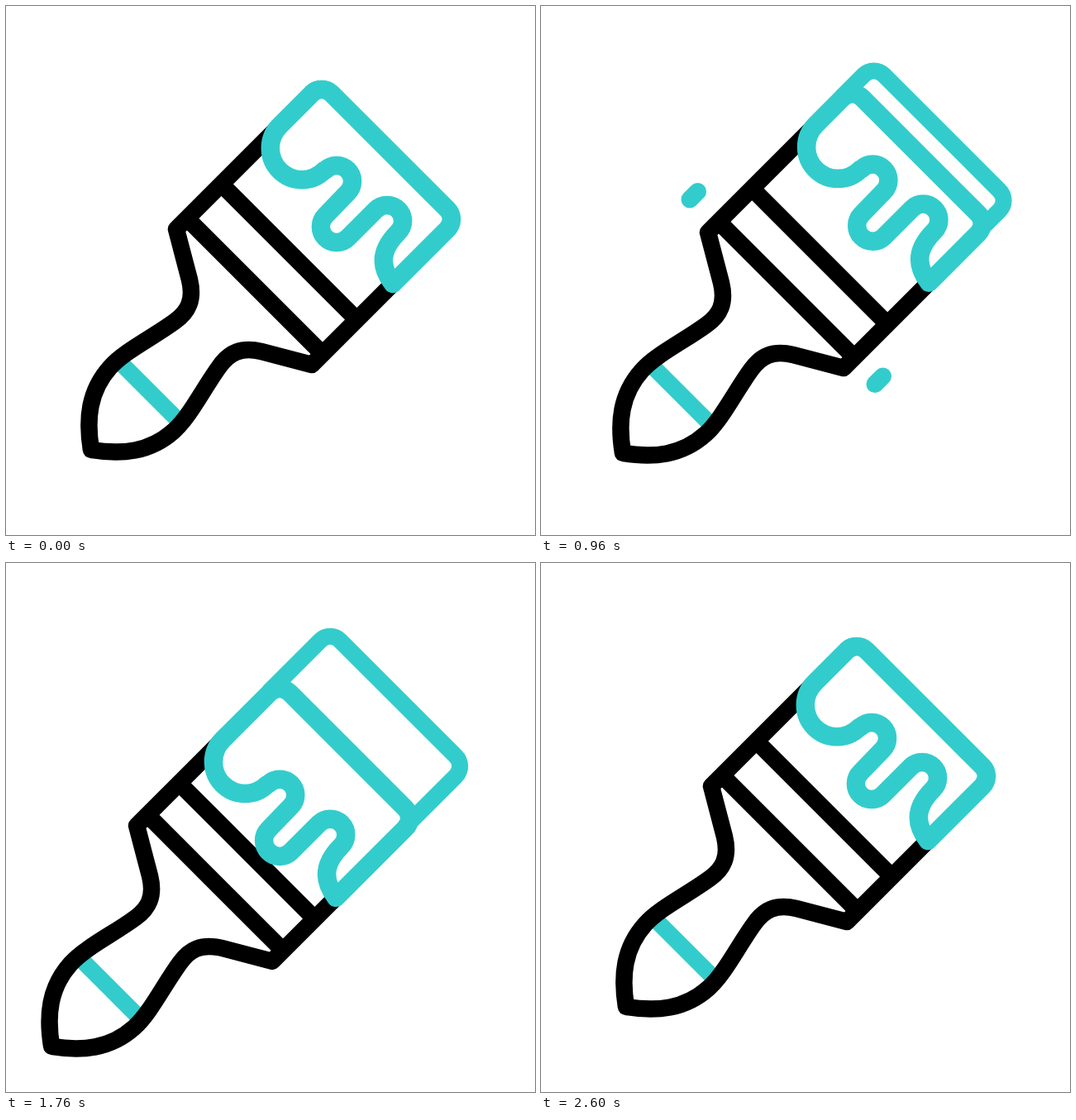
An HTML page for the animation above (3000 ms loop, 640 px wide and 640 px high).

```html
<!DOCTYPE html>
<html lang="en">
<head>
<meta charset="utf-8">
<title>Paint brush</title>
<style>
  html, body { margin: 0; width: 100%; height: 100%; overflow: hidden; background: #fff; }
  svg { display: block; width: 100vw; height: 100vh; }
  path { fill: none; stroke-linejoin: round; }
  .ink { stroke: #000; stroke-width: 20.5; }
  .teal { stroke: #3cc; stroke-width: 20; }
  .wet { stroke-width: 22.5; }
  .dash { stroke-width: 21; stroke-linecap: round; }
</style>
</head>
<body>
<svg viewBox="0 0 640 640">
  <defs>
    <path id="half" d="M103 537C97 500 100 466 126 437C144 417 178 401 205 381C220 370 228 356 222 331L206 270L335 141"/>
  </defs>
  <path id="stroke" class="teal" transform="translate(-1 -1)"/>
  <g id="handle">
    <path class="teal" d="M139 432L208 501"/>
    <g class="ink">
      <use href="#half"/>
      <use href="#half" transform="matrix(0 -1 -1 0 640 640)"/>
      <circle cx="103" cy="537" r="10.2" fill="#000" stroke="none"/>
      <path d="M219 257L383 421"/>
    </g>
  </g>
  <path id="band" class="ink" d="M260.5 215.5L424.5 379.5"/>
  <path id="paint" class="teal wet"/>
  <path id="dashes" class="teal dash"/>
</svg>
<script>
const LOOP = 3000;
const [stroke, handle, band, paint, dashes] =
  ['stroke', 'handle', 'band', 'paint', 'dashes'].map(id => document.getElementById(id));

// cubic-bezier(a, 0, b, 1)
const bezier = (a, b) => x => {
  let lo = 0, hi = 1, s = 0.5;
  for (let i = 0; i < 24; i++) {
    s = (lo + hi) / 2;
    const q = 1 - s;
    if (3 * a * s * q * q + 3 * b * s * s * q + s * s * s < x) lo = s; else hi = s;
  }
  return s * s * (3 - 2 * s);
};
const strong = bezier(0.5, 0.5);
const settle = bezier(0.4, 0.12);
const early = bezier(0.15, 0.2);
const smooth = x => x * x * (3 - 2 * x);

// Moves are [start, end, from, to, ease]; the last one begun holds its end value.
const track = moves => t => {
  let v = moves[0][2];
  for (const [start, end, from, to, ease] of moves) {
    if (t >= start) v = from + (to - from) * ease(Math.min(1, (t - start) / (end - start)));
  }
  return v;
};

// Every brush part rises together, then falls back to its own depth.
const sway = low => track([
  [110, 560, 0, 28.5, strong],
  [700, 1600, 28.5, low, settle],
  [1575, 2600, low, 0, strong]
]);
const handleAt = sway(-50.5);
const bristlesAt = sway(-53.7);
const edgeAt = sway(11.8);

// Drip relative to the handle
const dripAt = track([
  [110, 700, 0, 16, early],
  [700, 1480, 16, -25, smooth],
  [1480, 2580, -25, 0, smooth]
]);
const headAt = track([[880, 1490, 0, 199, smooth]]);
const tailAt = track([[1065, 1615, 0, 199, smooth]]);

// Point slid by d along the brush axis
const pt = (x, y, d) => `${x + d} ${y - d}`;
const slide = (node, d) => node.setAttribute('transform', `translate(${d} ${-d})`);

// End of the bristles, from the right side round to the left
const tipEdge = (d, sweep) =>
  `L${pt(534, 270, d)}A17 17 0 0 0 ${pt(534, 246, d)}` +
  `L${pt(394, 106, d)}A17 17 0 0 0 ${pt(370, 106, d)}`;

const DRIP = 'a38 38 0 0 0 54 54l1.5 -.5a19 19 0 0 1 27 27l-27 28a19 19 0 0 0 27 27' +
  'l34 -34a19 19 0 0 1 27 27c-16.5 16.5 -26.5 36.5 -6.5 62.5z';

function draw(t) {
  const h = handleAt(t), b = bristlesAt(t), d = h + dripAt(t);
  const head = headAt(t), tail = tailAt(t);

  slide(handle, h);
  slide(band, b);
  paint.setAttribute('d', `M${pt(468, 336, d)}${tipEdge(b)}L${pt(331, 145, d)}${DRIP}`);
  stroke.setAttribute('d', `M${pt(534, 270, b)}${tipEdge(edgeAt(t))}L${pt(370, 106, b)}`);

  const dash = (x, y) => `M${pt(x, y, tail)}L${pt(x, y, head)}`;
  dashes.setAttribute('d', head - tail > 0.2 ? dash(180, 234) + dash(404, 457.5) : '');
}

function frame() {
  draw(performance.now() % LOOP);
  requestAnimationFrame(frame);
}
frame();
</script>
</body>
</html>
```
